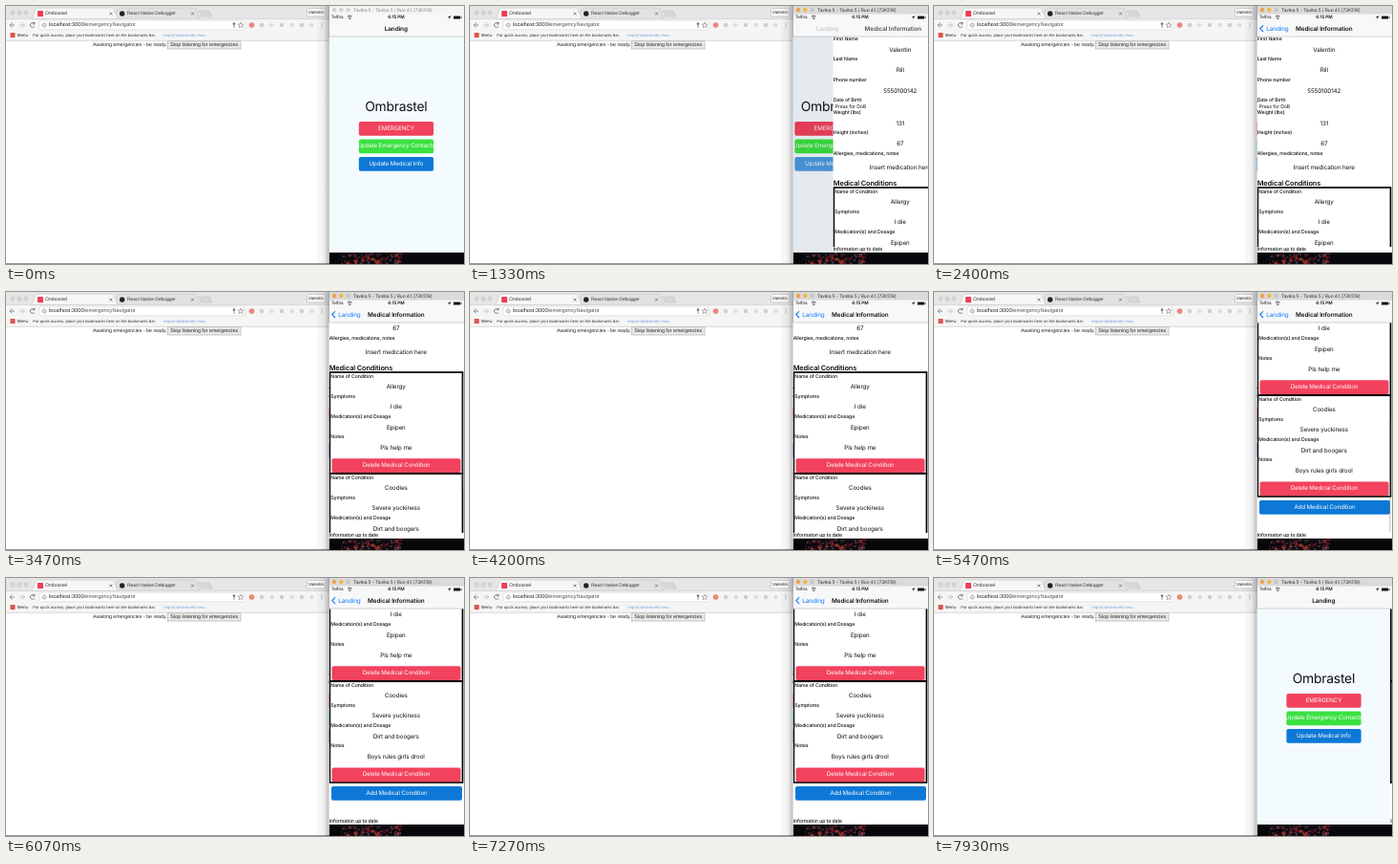
These frames come from a looping animation (480x270 px, 8000 ms). An HTML page:

```html
<!DOCTYPE html>
<html lang="en">
<head>
<meta charset="utf-8">
<style>
  html, body { margin: 0; width: 100%; height: 100%; overflow: hidden; background: #000; }
  svg { display: block; width: 100vw; height: 100vh; }
  text { white-space: pre; text-rendering: geometricPrecision; dominant-baseline: central; }
  .desk text { font-family: "Liberation Sans", Arial, sans-serif; }
  .phone text { font-family: Inter, Roboto, sans-serif; letter-spacing: -.018em; }
</style>
</head>
<body>
<svg id="stage" viewBox="0 0 480 270"></svg>
<script>
const LOOP = 8000, LEFT = 338.5, WIDTH = 141.5, MID = 408.8;
const RED = '#f2425d', GREEN = '#3be141', BLUE = '#0d78d6', LINK = '#0b7bff';

const rect = (x, y, w, h, fill, more = '') =>
  `<rect x="${x}" y="${y}" width="${w}" height="${h}" fill="${fill}" ${more}/>`;
const dot = (x, y, r, fill, more = '') =>
  `<circle cx="${x}" cy="${y}" r="${r}" fill="${fill}" ${more}/>`;
const path = (d, stroke, width = .8, more = '') =>
  `<path d="${d}" fill="none" stroke="${stroke}" stroke-width="${width}" ${more}/>`;
const text = (x, y, size, str, fill = '#111', more = '') =>
  `<text x="${x}" y="${y}" font-size="${size}" fill="${fill}" ${more}>${str}</text>`;
const centered = (x, y, size, str, fill, more = '') =>
  text(x, y, size, str, fill, `text-anchor="middle" ${more}`);
const label = (y, str, x = 338.7) => text(x, y, 5.2, str, '#111', 'font-weight="500"');
const value = (y, str) => centered(MID, y, 6.3, str);
const button = (x, y, w, h, fill, str) =>
  rect(x, y, w, h, fill, 'rx="2"') + centered(x + w / 2, y + h / 2, 6.2, str, '#fff');

function wallpaper() {
  let seed = 7, out = rect(0, 0, 480, 270, '#08080c');
  const random = () => (seed = seed * 16807 % 2147483647) / 2147483647;
  for (let i = 0; i < 110; i++) {
    const x = 352 + random() * 64, y = 259 + random() * 11;
    out += dot(x, y, .5 + random() * 1.3, ['#5d1b20', '#96302e', '#30141c', '#3a3540'][i % 4]);
  }
  return out;
}

function browser() {
  const grey = '#8b8b8b';
  const tab = (x, w, fill) =>
    `<path d="M${x} 13.5L${x + 4} 3Q${x + 4.5} 2 ${x + 6} 2H${x + w - 6}Q${x + w - 4.5} 2 ${x + w - 4} 3L${x + w} 13.5Z" fill="${fill}" stroke="#b9b9b9" stroke-width=".5"/>`;
  const cross = x => path(`M${x - 1.5} 6.5l3 3m0-3l-3 3`, '#666', .7);
  return rect(0, 0, 339, 269.2, '#fff') + rect(0, 0, 339, 14, '#e6e6e6') +
    [7, 14, 21].map(x => dot(x, 7, 2.3, '#d4d4d4', 'stroke="#c2c2c2" stroke-width=".4"')).join('') +
    tab(113, 90, '#e1e1e1') +
    `<path d="M202 5h11l3 6h-11z" fill="#d8d8d8" stroke="#b9b9b9" stroke-width=".5"/>` +
    rect(0, 13.5, 339, 23, '#f5f5f5') + path('M0 13.5H339', '#c4c4c4', .5) + tab(27, 90, '#f6f6f6') +
    rect(33, 5, 6, 6, '#ec3f55', 'rx=".6"') + text(41, 8, 5, 'Ombrastel', '#333') + cross(110) +
    dot(121.7, 8, 2.7, '#222') + text(127, 8, 4.9, 'React Native Debugger', '#333') + cross(195.5) +
    rect(315.5, 2.5, 19, 8.5, '#fafafa', 'rx="1.5" stroke="#aaa" stroke-width=".5"') +
    centered(325, 6.9, 4.5, 'Valentin', '#222') +
    path('M9 20H4m2.5-2.5L4 20l2.5 2.5', '#777') + path('M14 20h5.5m-2.5-2.5l2.5 2.5-2.5 2.5', '#bbb') +
    path('M29.8 18.5a2.4 2.4 0 1 0 .2 2.5M30 16.8v2h-2', '#666') +
    rect(35, 15.3, 215, 9.5, '#fff', 'rx="1.5" stroke="#cfcfcf" stroke-width=".5"') +
    dot(40.3, 20, 2, 'none', 'stroke="#777" stroke-width=".6"') + path('M40.3 19.6v1.5m0-2.4v.4', '#777', .6) +
    text(45, 20.2, 5.7, 'localhost:3000/<tspan fill="#555">emergencyNavigator</tspan>', '#222') +
    dot(239, 18.6, 1.3, '#777') + path('M239 19v4', '#777') +
    path('M246 17l.8 2 2.2.1-1.7 1.4.6 2.1-1.9-1.2-1.9 1.2.6-2.1-1.7-1.4 2.2-.1z', '#777', .6) +
    dot(257.5, 20, 2.8, '#ee8373') +
    [268, 278.5, 289, 299.5, 310, 320.5].map((x, i) =>
      dot(x, 20, 2.2, i % 2 ? '#dcdcdc' : '#cecece')).join('') +
    [18, 20, 22].map(y => dot(331, y, .6, grey)).join('') +
    rect(4.5, 28, 5, 5, '#e0524c') + text(11.7, 30.8, 4.5, 'Menu', '#222') +
    text(28.2, 30.8, 4.25, 'For quick access, place your bookmarks here on the bookmarks bar.', '#333') +
    text(165.3, 30.8, 4.25, 'Import bookmarks now...', '#6d9fe8') +
    path('M0 36.3H339', '#c4c4c4', .6) +
    text(91, 41, 5.28, 'Awaiting emergencies - be ready.', '#222') +
    rect(169.5, 36.8, 76.5, 8.2, '#e9e9e9', 'stroke="#a6a6a6" stroke-width=".6"') +
    centered(207.7, 41, 5.28, 'Stop listening for emergencies', '#222') +
    rect(0, 269.2, 339, .8, '#b5b5b8') +
    rect(324, 0, 15, 270, 'url(#shade)');
}

function condition(top, [name, symptom, dosage, note]) {
  const row = (y, str, val) => label(top + y, str, 340.3) + value(top + y + 10.5, val);
  return rect(339.3, top, 139.2, 105.8, '#fff', 'stroke="#000" stroke-width="1.7"') +
    row(4.5, 'Name of Condition', name) + row(25.7, 'Symptoms', symptom) +
    row(47, 'Medication(s) and Dosage', dosage) + row(68.2, 'Notes', note) +
    button(341.5, top + 90.3, 135, 14.7, RED, 'Delete Medical Condition');
}

function medical() {
  const fields = [
    [35, 'First Name', 'Valentin'], [56.4, 'Last Name', 'Rill'], [77.8, 'Phone number', '5550100142'],
    [111.7, 'Weight (lbs)', '131'], [133, 'Height (inches)', '67']];
  return rect(LEFT, 32, WIDTH, 226, '#fff') +
    `<g clip-path="url(#list)"><g id="form">` +
    fields.map(([y, name, val]) => label(y, name) + value(y + 10.8, val)).join('') +
    label(99.4, 'Date of Birth') + text(340.7, 105.6, 5.2, 'Press for DoB') +
    label(154.6, 'Allergies, medications, notes') + value(169, 'Insert medication here') +
    text(338.7, 185.2, 7.4, 'Medical Conditions', '#111', 'font-weight="600"') +
    condition(190, ['Allergy', 'I die', 'Epipen', 'Pls help me']) +
    condition(296.2, ['Coodies', 'Severe yuckiness', 'Dirt and boogers', 'Boys rules girls drool']) +
    button(341, 406, 137, 14.8, BLUE, 'Add Medical Condition') +
    `</g>` + rect(477.3, 33, 1.1, 118, '#777', 'id="thumb" rx=".5"') + `</g>` +
    label(254.8, 'Informaton up to date');
}

function landing() {
  return rect(LEFT, 32, WIDTH + 45, 226, '#f4fbff') +
    centered(MID, 105.5, 13.9, 'Ombrastel', '#111') +
    button(369.8, 121, 78.3, 14.7, RED, 'EMERGENCY') +
    button(369.8, 139.5, 78.3, 14.7, GREEN, 'Update Emergency Contacts') +
    `<g id="infoButton">${button(369.8, 158, 78.3, 14.7, BLUE, 'Update Medical Info')}</g>`;
}

function simulator() {
  const nav = 'font-weight="600"';
  return rect(339, 0, 141, 258, '#f8f8f8') +
    `<g class="desk">` + rect(339, 0, 141, 8.5, '#f4f4f4', 'id="titlebar"') +
    [344, 351.3, 358.6].map(x => dot(x, 4, 2.2, '#d3d3d3', 'class="light"')).join('') +
    text(364, 4.5, 4.9, 'Tavika 5 - Tavika 5 / Ruo 4.1 (72K518)', '#777', 'id="caption"') + `</g>` +
    text(340.8, 12, 4.5, 'Telfira') +
    path('M357.8 11a3.6 3.6 0 0 1 4.8 0m-3.8 1.4a2.1 2.1 0 0 1 2.8 0', '#111', .7) + dot(360.2, 13.6, .6, '#111') +
    centered(MID, 12, 4.7, '6:15 PM', '#111', nav) +
    `<path d="M466.5 10l-4 2h2v2z" fill="#111"/>` +
    rect(469, 10.4, 7.3, 3.2, '#111', 'rx=".6"') + rect(476.8, 11.3, .8, 1.4, '#111') +
    `<g clip-path="url(#screen)"><g id="landing">${landing()}</g>` +
    rect(LEFT, 32, WIDTH, 226, '#000', 'id="dim"') +
    `<g id="medical">${medical()}</g>` +
    path('M338.5 32H480', '#b2b2b2', .6) +
    `<g id="back">` + path('M345 20.2l-3.2 3.4 3.2 3.4', LINK, 1.1) + `</g>` +
    centered(MID, 23.7, 6.4, 'Landing', '#111', nav + ' id="homeTitle"') +
    centered(360, 23.7, 6.4, 'Landing', LINK, 'id="backTitle"') +
    centered(MID, 23.7, 6.4, 'Medical Information', '#111', nav + ' id="formTitle"') + `</g>`;
}

const stage = document.getElementById('stage');
stage.innerHTML =
  `<defs><clipPath id="screen">${rect(LEFT, 15, WIDTH, 243, '#000')}</clipPath>
   <clipPath id="list">${rect(LEFT, 32.3, WIDTH, 219.7, '#000')}</clipPath>
   <linearGradient id="shade"><stop stop-opacity="0"/><stop offset=".6" stop-opacity=".06"/>
   <stop offset="1" stop-opacity=".28"/></linearGradient></defs>` +
  wallpaper() + `<g class="desk">${browser()}</g><g class="phone">${simulator()}</g>`;

const $ = id => document.getElementById(id);
const set = (id, name, val) => $(id).setAttribute(name, val);
const shift = (id, x, y = 0) => set(id, 'transform', `translate(${x} ${y})`);
const progress = (t, from, to) => Math.min(1, Math.max(0, (t - from) / (to - from)));
const easeOut = (p, power) => 1 - (1 - p) ** power;
const lights = document.querySelectorAll('.light');

const swipes = [{ from: 2640, to: 3470, by: 106 }, { from: 4650, to: 5430, by: 82 }];

function draw(t) {
  const active = t >= 900;
  set('titlebar', 'fill', active ? '#dadada' : '#f4f4f4');
  set('caption', 'fill', active ? '#333' : '#888');
  lights.forEach((light, i) => light.setAttribute('fill', active ? ['#eda24f', '#efb64a', '#c6c6c6'][i] : '#d3d3d3'));

  // The tapped button fades out, then recovers while the next screen slides in.
  set('infoButton', 'opacity', 1 - .8 * (progress(t, 1015, 1165) - progress(t, 1165, 1415)));

  const shown = easeOut(progress(t, 1165, 1665), 3) - easeOut(progress(t, 7540, 8040), 3);
  const hidden = 1 - shown;
  shift('landing', -42 * shown);
  set('dim', 'opacity', .1 * shown);
  shift('medical', 141 * hidden);
  set('medical', 'visibility', shown > 0 ? 'visible' : 'hidden');
  shift('homeTitle', -49 * shown);
  set('homeTitle', 'opacity', Math.max(0, 1 - shown * 1.2));
  shift('backTitle', 49 * hidden);
  set('backTitle', 'opacity', shown ** 7);
  set('back', 'opacity', shown ** 7);
  shift('formTitle', 116 * hidden);
  set('formTitle', 'opacity', shown);

  let scroll = 0, glow = 0;
  for (const { from, to, by } of swipes) {
    scroll += by * easeOut(progress(t, from, to), 2);
    glow = Math.max(glow, progress(t, from, from + 60) * (1 - progress(t, to - 80, to + 150)));
  }
  shift('form', 0, -scroll);
  shift('thumb', 0, scroll * .53);
  set('thumb', 'opacity', glow);
}

const start = performance.now();
function tick() {
  draw((performance.now() - start) % LOOP);
  requestAnimationFrame(tick);
}
tick();
</script>
</body>
</html>
```
